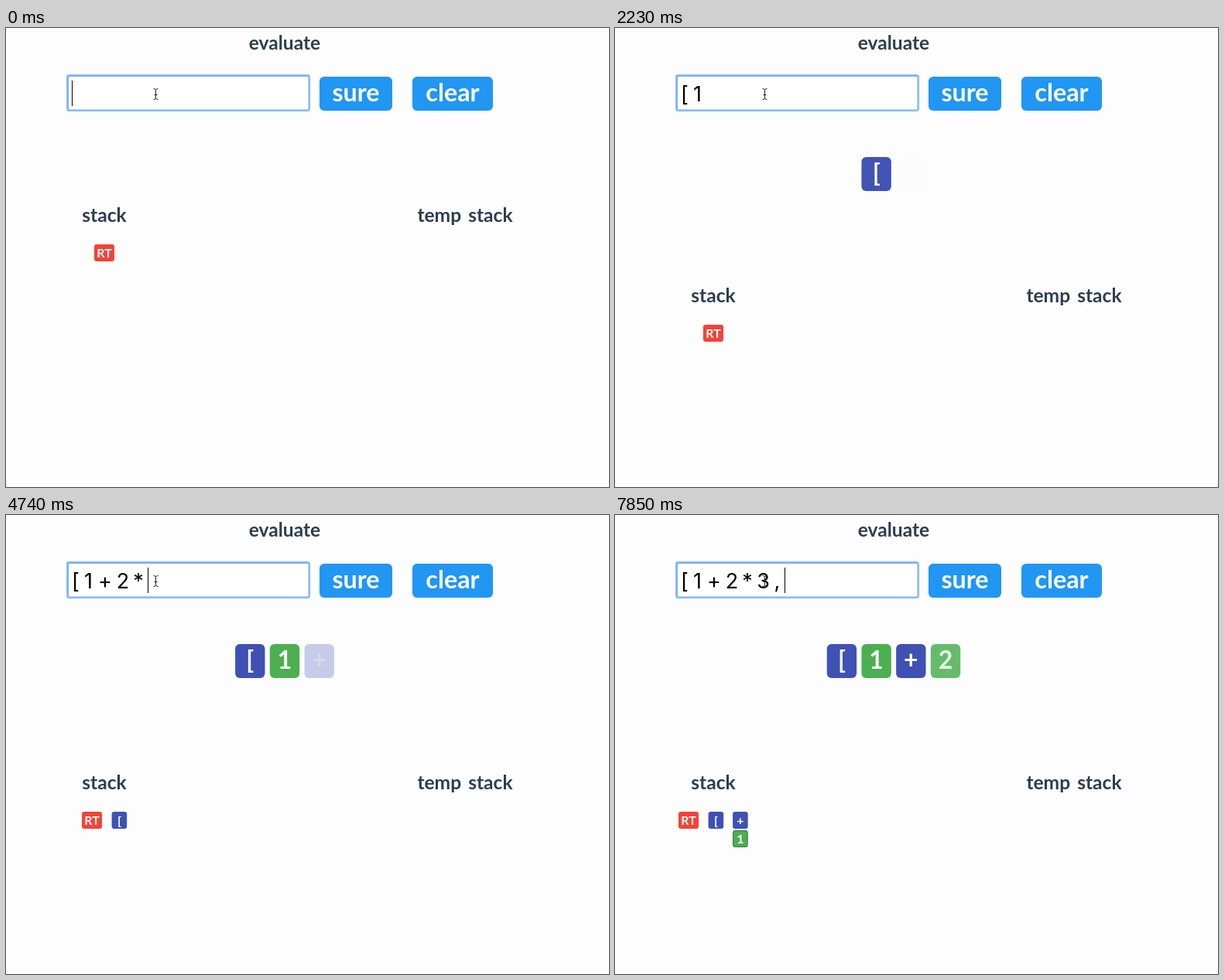
Write an HTML page with a canvas that moves like this. It is 779x594 px and loops after 8000 ms.

```html
<!DOCTYPE html>
<html lang="en">
<head>
<meta charset="utf-8">
<title>evaluate</title>
<style>
  html, body { margin: 0; width: 100%; height: 100%; overflow: hidden; background: #fdfdfd; }
  canvas { display: block; }
</style>
</head>
<body>
<canvas id="stage" width="779" height="594"></canvas>
<script>
const ctx = document.getElementById('stage').getContext('2d');
const LOOP = 8000, STEP = 148, FADE = 2000;
const INDIGO = '#3f51b5', GREEN = '#4caf50', RED = '#f44336', BLUE = '#2196f3', INK = '#2c3e50';
const HEAD = 'Lato, sans-serif', TYPE = 'Inter, sans-serif';

// typed character, time of the key press, caret position after it
const keys = [
  ['[', 290, 95], [' ', 580, 100], ['1', 1180, 113], [' ', 1480, 119],
  ['+', 2810, 137], [' ', 2960, 143], ['2', 3400, 159], [' ', 3550, 165],
  ['*', 4580, 177], [' ', 4730, 183], ['3', 5620, 200], [' ', 7240, 206],
  [',', 7530, 213], [' ', 7690, 219]
];
const tokens = [['[', 240], ['1', 2200], ['+', 4150], ['2', 6140]];
const pushes = [3250, 5170, 7100];

const colorOf = s => s === 'RT' ? RED : /\d/.test(s) ? GREEN : INDIGO;

function text(s, x, y, size, color = '#fff', weight = 700, family = HEAD) {
  ctx.font = `${weight} ${size}px ${family}`;
  ctx.fillStyle = color;
  ctx.textAlign = 'center';
  ctx.fillText(s, x, y);
}

function box(x, y, w, h, r, color) {
  ctx.fillStyle = color;
  ctx.beginPath();
  ctx.roundRect(x, y, w, h, r);
  ctx.fill();
}

function button(s, x, w) {
  box(x, 63, w, 44, 6, BLUE);
  text(s, x + w / 2, 95, 32.3);
}

function chip(s, x, y) {
  const w = s === 'RT' ? 26 : 19.6;
  box(x, y, w, 22, 3, colorOf(s));
  if (s === '1') {
    ctx.strokeStyle = 'rgba(44,62,80,.55)';
    ctx.lineWidth = 1;
    ctx.beginPath();
    ctx.roundRect(x + .5, y + .5, w - 1, 21, 3);
    ctx.stroke();
  }
  text(s, x + w / 2, y + 16.5, 16);
}

function input(t) {
  box(77.5, 59.5, 316, 49, 4, '#cfe2fc');
  box(78.5, 60.5, 314, 47, 3, '#77b0f9');
  box(81, 63, 309.5, 42.5, 0, '#fff');
  let caret = 85, last = 0;
  for (const [c, at, end] of keys) {
    if (t < at) break;
    text(c, (caret + end) / 2, 95, 27, '#000', 400, TYPE);
    caret = end;
    last = at;
  }
  if ((t - last) % 1000 < 500) {
    ctx.fillStyle = '#000';
    ctx.fillRect(caret, 68, 1, 33);
  }
}

function pointer() {
  ctx.strokeStyle = '#222';
  ctx.lineWidth = 1;
  ctx.beginPath();
  ctx.moveTo(190.5, 78.5);
  ctx.quadraticCurveTo(193.5, 78.5, 193.5, 80.5);
  ctx.lineTo(193.5, 90.5);
  ctx.quadraticCurveTo(193.5, 92.5, 190.5, 92.5);
  ctx.moveTo(196.5, 78.5);
  ctx.quadraticCurveTo(193.5, 78.5, 193.5, 80.5);
  ctx.moveTo(193.5, 90.5);
  ctx.quadraticCurveTo(193.5, 92.5, 196.5, 92.5);
  ctx.moveTo(191.5, 86.5);
  ctx.lineTo(195.5, 86.5);
  ctx.stroke();
}

function tokenRow(t) {
  const row = tokens.filter(([, at]) => t >= at);
  row.forEach(([s, at], i) => {
    const x = 360 + (i - (row.length - 1) / 2) * 44.7;
    ctx.globalAlpha = Math.min(1, (t - at) / FADE);
    box(x - 19.2, 167, 38.4, 44, 6, colorOf(s));
    text(s, x, 199, 32);
  });
  ctx.globalAlpha = 1;
  return row.length;
}

function stack(t, y) {
  const n = pushes.filter(at => t >= at).length;
  const cols = [['RT'], ['RT', '['], ['RT', '[', '1'], ['RT', '[', '+']][n];
  let x = 114 - 16 * Math.min(n, 2);
  for (const s of cols) {
    chip(s, x, y);
    x += s === 'RT' ? 38.6 : 31.5;
  }
  if (n === 3) chip('1', 152.1, y + 24);
}

function draw(now) {
  const t = Math.floor(now % LOOP / STEP) * STEP;
  ctx.fillStyle = '#fdfdfd';
  ctx.fillRect(0, 0, 779, 594);
  text('evaluate', 360, 28, 24.6, INK);
  input(t);
  pointer();
  button('sure', 405, 94);
  button('clear', 525, 104);
  const drop = tokenRow(t) ? 104 : 0;
  text('stack', 127, 251 + drop, 24.6, INK);
  ctx.wordSpacing = '3px';
  text('temp stack', 593, 251 + drop, 24.6, INK);
  ctx.wordSpacing = '0px';
  stack(t, 280 + drop);
}

const start = performance.now();
(function tick() {
  draw(performance.now() - start);
  requestAnimationFrame(tick);
})();
</script>
</body>
</html>
```
